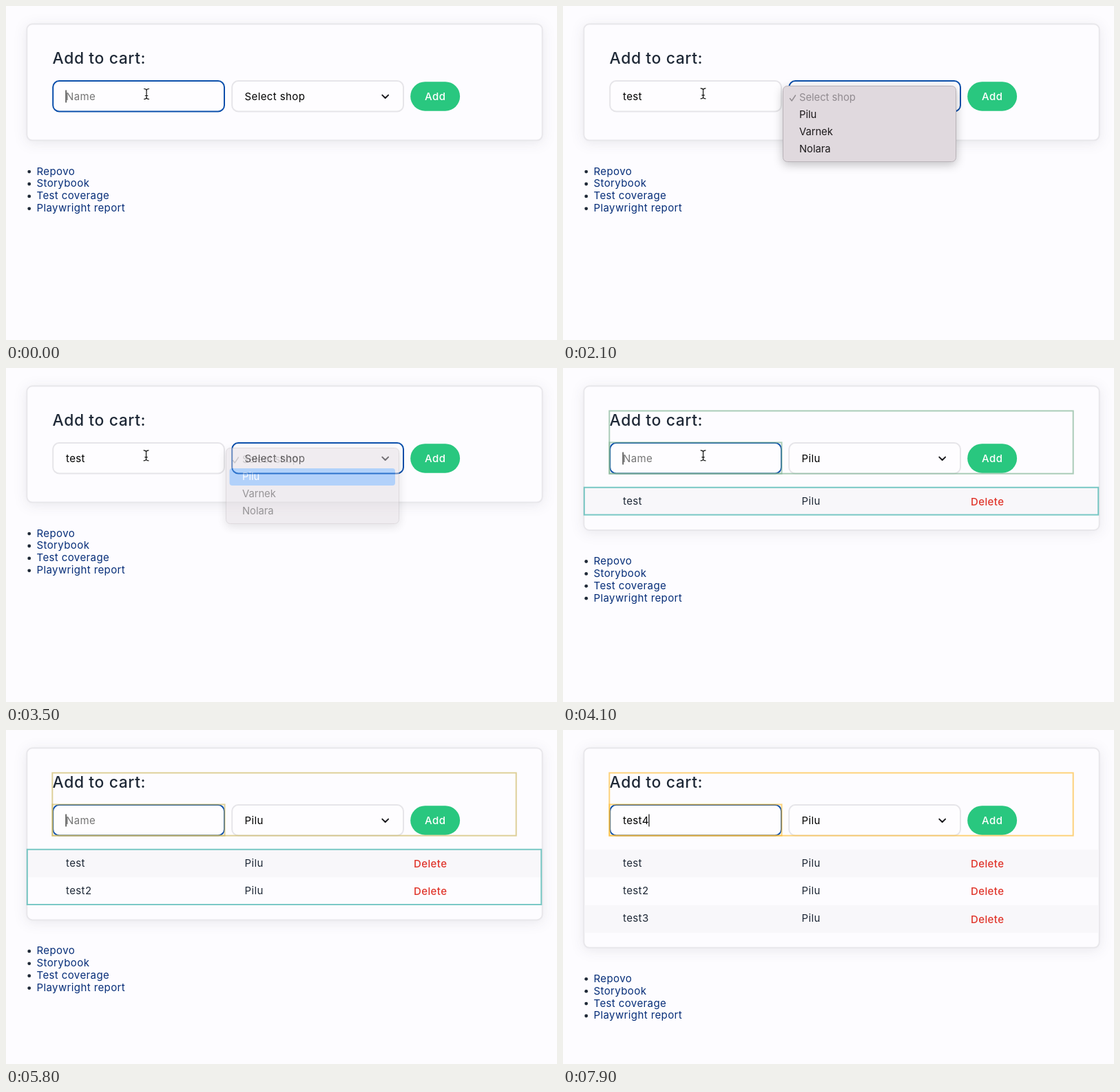
An HTML page for the animation above (8000 ms loop, 800x486 px).

```html
<!DOCTYPE html>
<html lang="en">
<head>
<meta charset="utf-8">
<title>Add to cart</title>
<style>
  html, body { margin: 0; width: 100%; height: 100%; overflow: hidden; background: #fdfcff; }
  svg { display: block; width: 800px; height: 486px; }
  text { font: 15px Inter, "Open Sans", sans-serif; letter-spacing: .4px; fill: #1f2937; white-space: pre; }
  .title { font-size: 22.8px; font-weight: 500; letter-spacing: .65px; }
  .field { fill: #000; }
  .hint { fill: #757575; }
  .add { font-weight: 500; fill: #fff; text-anchor: middle; }
  .link { fill: #052d78; }
  .delete { font-weight: 500; fill: #e0352b; }
  .menu text { font-size: 14.8px; letter-spacing: -.05px; fill: #1d1a1c; }
  .menu .off { fill: #918b90; }
  .menu .on { fill: #fff; }
  .card { filter: drop-shadow(0 3px 9px rgba(30, 30, 60, .09)); }
  .menu .panel { filter: drop-shadow(0 4px 7px rgba(0, 0, 0, .24)); }
</style>
</head>
<body>
<svg id="stage" viewBox="0 0 800 486"></svg>
<script>
const LOOP = 8000, ROW = 40.4, HOLD = 650;
const SHOPS = ['Pilu', 'Varnek', 'Nolara'];
const LINKS = ['Repovo', 'Storybook', 'Test coverage', 'Playwright report'];
const HEAT = ['#37afa9', '#63b19e', '#80b393', '#97b488', '#abb67d',
              '#beb771', '#cfb965', '#dfba57', '#efbb49', '#febc38'];

// Each render of the form: time, input text, number of renders it causes.
const RENDERS = [
  [400, 't', 1], [500, 'te', 1], [600, 'tes', 1], [800, 'test', 1],
  [3700, 'test', 1], [3800, '', 2],
  [4990, 't', 1], [5000, 'te', 1], [5100, 'tes', 1], [5300, 'test', 1], [5500, 'test2', 1], [5800, '', 2],
  [6000, 't', 1], [6100, 'te', 1], [6300, 'tes', 1], [6500, 'test', 1], [6700, 'test3', 1], [7000, '', 2],
  [7200, 't', 1], [7300, 'te', 1], [7500, 'tes', 1], [7700, 'test', 1], [7900, 'test4', 1],
];
const ADDED = [[3800, 'test'], [5800, 'test2'], [7000, 'test3']];
const TAB = 1900, MENU_OPEN = 2100, ARROW = 2900, MENU_FADE = 3390, CHOSEN = 3700, REFOCUS = 4100;

const stage = document.getElementById('stage');

const text = (x, y, content, cls = '', extra = '') =>
  `<text x="${x}" y="${y}" class="${cls}" ${extra}>${content}</text>`;
const box = (x, y, w, h, r, fill, stroke = 'none', extra = '') =>
  `<rect x="${x}" y="${y}" width="${w}" height="${h}" rx="${r}" fill="${fill}" stroke="${stroke}" stroke-width="2" ${extra}/>`;
const line = (d, color, width) =>
  `<path d="${d}" fill="none" stroke="${color}" stroke-width="${width}" stroke-linecap="round" stroke-linejoin="round"/>`;
const glow = (x, y, w, h, count) =>
  box(x, y, w, h, 0, 'none', HEAT[Math.min(count, HEAT.length) - 1], 'stroke-opacity=".66"');
const field = (x, focused) =>
  box(x, 109.1, 248.8, 44.3, 9, '#fefdff', focused ? '#0b4fab' : '#e6e5e9');

function formState(t) {
  const state = { value: '', count: 0, last: 0 };
  for (const [at, value, renders] of RENDERS) {
    if (at > t) break;
    state.count = (at - state.last < HOLD ? state.count : 0) + renders;
    state.value = value;
    state.last = at;
  }
  return state;
}

function card(rows) {
  let out = box(30.3, 26.3, 748.4, 169.3 + rows.length * ROW, 8, '#fdfcff', '#e8e7eb', 'class="card"');
  rows.forEach(([, name], i) => {
    const y = 174 + i * ROW;
    if (i % 2 === 0) out += box(31, y, 747, ROW, 0, '#f8f7fa');
    out += text(87, y + 24.5, name) + text(346.5, y + 24.5, SHOPS[0]) + text(592, y + 26, 'Delete', 'delete');
  });
  return out;
}

function links(shift) {
  return LINKS.map((name, i) => {
    const y = 245.5 + shift + i * 17.9;
    return `<circle cx="33.7" cy="${y - 4.4}" r="2.4" fill="#1f2937"/>` + text(44.5, y, name, 'link');
  }).join('');
}

function menu(t) {
  const opacity = Math.min(1, 1 - (t - MENU_FADE) / 200);
  if (t < MENU_OPEN || opacity <= 0) return '';
  const active = t >= ARROW;
  let out = '<rect class="panel" x="319.5" y="116.5" width="251" height="110" rx="6" fill="#e0d9de" stroke="#b9b3b8"/>';
  if (active) out += box(324.5, 146, 240.5, 25, 4, '#589ff6');
  out += line('M329.5 134.5l2.7 3.5 5.3-8', '#918b90', 1.4) + text(343, 138.3, 'Select shop', 'off');
  SHOPS.forEach((shop, i) => out += text(343, 163.3 + i * 25, shop, active && i === 0 ? 'on' : ''));
  return `<g class="menu" opacity="${opacity.toFixed(3)}">${out}</g>`;
}

function pointer(x, y) {
  const beam = `M${x - 3.5} ${y - 7.5}q3 0 3.5 2q.5 -2 3.5 -2M${x} ${y - 5.5}v11` +
               `M${x - 3.5} ${y + 7.5}q3 0 3.5 -2q.5 2 3.5 2M${x - 1.8} ${y + 2.5}h3.6`;
  return line(beam, '#fff', 2.6) + line(beam, '#111', 1.2);
}

function scene(t) {
  const { value, count, last } = formState(t);
  const rows = ADDED.filter(([at]) => at <= t);
  const inputFocused = t < TAB || t >= REFOCUS;
  const selectFocused = t >= TAB && t < ADDED[0][0];
  const blinkStart = last < REFOCUS && t >= REFOCUS ? REFOCUS : last;
  const caretOn = inputFocused && (t - blinkStart) % 1000 < 500;

  let out = card(rows) + links(rows.length * ROW);
  out += text(67.5, 84, 'Add to cart:', 'title');
  out += field(68.2, inputFocused) + field(328.2, selectFocused);
  out += text(87, 137, value || 'Name', value ? 'field' : 'hint', 'id="entry"');
  out += text(346.5, 137, t < CHOSEN ? 'Select shop' : SHOPS[0], 'field');
  out += line('M546.3 129.6l4.4 4.4 4.4-4.4', '#1a1a1e', 2);
  out += box(587.2, 110.2, 71.9, 42.5, 21.25, '#29c77f') + text(623.2, 137, 'Add', 'add');
  if (caretOn) out += '<rect id="caret" x="86.5" y="122.5" width="1.2" height="18" fill="#111"/>';

  if (count && t - last < HOLD) {
    out += glow(67.3, 62.4, 673.4, 91.3, count) + glow(67.5, 108.4, 250, 45.3, count);
  }
  const newest = rows[rows.length - 1];
  if (newest && t - newest[0] < HOLD) out += glow(30.8, 173.8, 746.4, rows.length * ROW - .6, 1);

  out += menu(t);
  if (t < RENDERS[0][0]) out += pointer(204, 128);
  else if (t >= MENU_OPEN && t < 4990) out += pointer(203.5, 127.3);
  return { markup: out, value };
}

let shown = '';
const start = performance.now();
function draw() {
  // Screen updates arrive in steps of 100 ms.
  const t = Math.floor((performance.now() - start) % LOOP / 100) * 100;
  const { markup, value } = scene(t);
  if (markup !== shown) {
    stage.innerHTML = shown = markup;
    const caret = document.getElementById('caret');
    if (caret && value) {
      caret.setAttribute('x', 86.5 + document.getElementById('entry').getComputedTextLength());
    }
  }
  requestAnimationFrame(draw);
}
draw();
</script>
</body>
</html>
```
